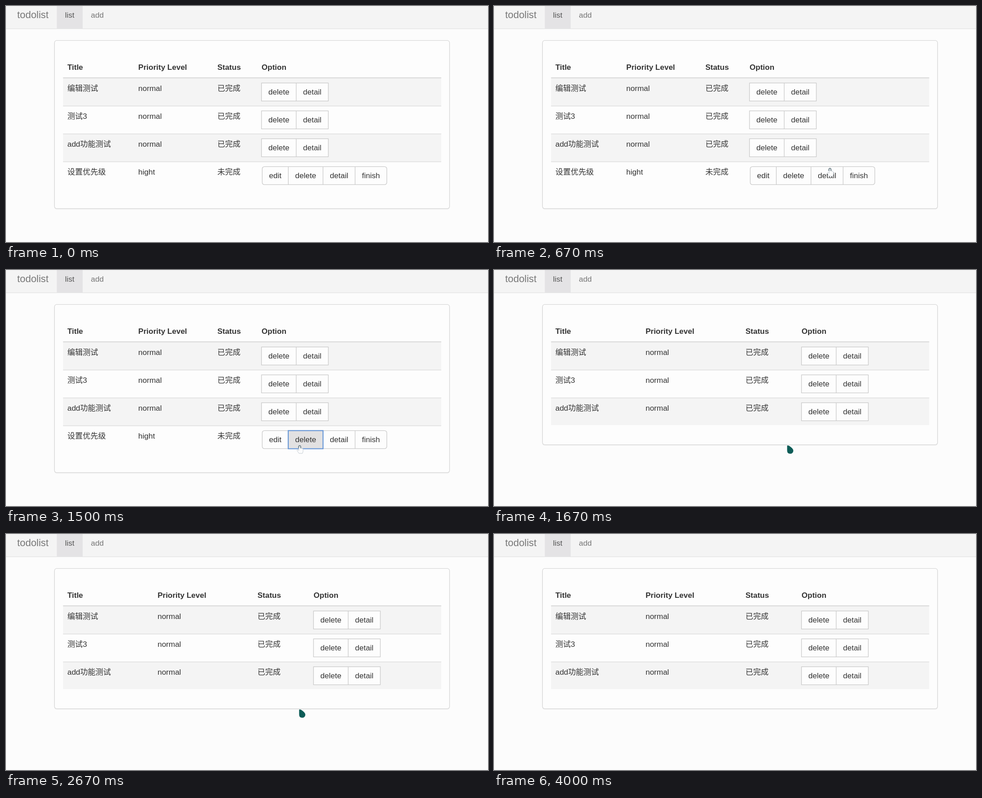
Write an HTML page that moves like this. It is 1066 px wide and 525 px high and loops after 4.49 s.

```html
<!DOCTYPE html>
<html lang="zh-CN">
<head>
<meta charset="utf-8">
<title>todolist</title>
<style>
html, body { margin: 0; width: 100%; height: 100%; overflow: hidden; background: #fcfcfc; }
svg { display: block; width: 100vw; height: 100vh; }
text { font: 17px "Liberation Sans", Arial, "Noto Sans CJK SC", "Noto Sans CJK", sans-serif; fill: #333; white-space: pre; }
.head { font-weight: bold; }
.brand { font-size: 21.86px; fill: #777; }
.link { fill: #777; }
.on { fill: #555; }
.btn { fill: #fdfdfd; stroke: #c9c9c9; stroke-width: 1.3; }
.line { fill: #dadada; }
.stripe { fill: #f4f4f4; }
</style>
</head>
<body>
<svg id="stage" viewBox="0 0 1066 525"></svg>
<script>
const LOOP = 4490;
const stage = document.getElementById("stage");

function add(parent, tag, attrs, label) {
  const el = document.createElementNS("http://www.w3.org/2000/svg", tag);
  for (const key in attrs) el.setAttribute(key, attrs[key]);
  if (label) el.textContent = label;
  parent.append(el);
  return el;
}
const rect = (p, x, y, width, height, more) => add(p, "rect", { x, y, width, height, ...more });
const text = (p, x, y, label, cls = "") => add(p, "text", { x, y, class: cls }, label);

const WIDTH = { edit: 59, delete: 77.9, detail: 72.2, finish: 71.3 };

// Joined buttons; returns the left edge of each
function buttons(p, x, y, names, radius) {
  const edges = {};
  const total = names.reduce((sum, n) => sum + WIDTH[n] - 1.2, 1.2);
  rect(p, x + .6, y + .6, total - 1.2, 40.1, { rx: radius, class: "btn" });
  names.forEach((name, i) => {
    edges[name] = x;
    if (i) add(p, "path", { d: `M${x + .6} ${y + .6}v40.1`, class: "btn" });
    text(p, x + 15.8, y + 26.3, name);
    x += WIDTH[name] - 1.2;
  });
  return edges;
}

// Page bar
rect(stage, 0, 0, 1066, 50.5, { fill: "#f4f4f4" });
rect(stage, 0, 50, 1066, 1.2, { fill: "#e2e2e2" });
rect(stage, 112.4, 0, 57.2, 50.3, { fill: "#e4e3e5" });
text(stage, 24.8, 27.3, "todolist", "brand");
text(stage, 130.5, 25.8, "list", "on");
text(stage, 187.8, 25.8, "add", "link");

const ROWS = [
  ["编辑测试", "normal", "已完成"],
  ["测试3", "normal", "已完成"],
  ["add功能测试", "normal", "已完成"],
  ["设置优先级", "hight", "未完成"]
];

function table(count, cols) {
  const g = add(stage, "g", {});
  const h = 126 + count * 62;
  rect(g, 107.3, 77.9, 873.6, h, { rx: 5, fill: "none", stroke: "#ededed", "stroke-width": 1.4 });
  rect(g, 107.3, 76.7, 873.6, h, { rx: 5, fill: "#fdfdfd", stroke: "#d8d8d8", "stroke-width": 1.3 });
  ["Title", "Priority Level", "Status", "Option"].forEach((t, i) => text(g, cols[i], 142, t, "head"));
  ROWS.slice(0, count).forEach((row, i) => {
    const y = 160 + i * 62;
    if (i % 2 === 0) rect(g, 126.2, y, 836.3, i === 2 && count === 3 ? 61 : 62, { class: "stripe" });
    rect(g, 126.2, i ? y - .1 : 158.7, 836.3, i ? 1.3 : 2.2, { class: "line" });
    row.forEach((t, c) => text(g, cols[c], y + 29, t));
    if (i < 3) buttons(g, cols[3] - .8, y + 10.7, ["delete", "detail"], 0);
  });
  return g;
}

const full = table(4, [135.7, 292.6, 467.4, 565.3]);
buttons(full, 566, 356.7, ["edit", "delete", "detail", "finish"], 5);
const press = add(full, "g", {});
const pressBox = rect(press, 624.2, 357.3, 77, 40.3, {});
text(press, 639.6, 383, "delete");
const short = table(3, [135.7, 335.2, 556.2, 680.3]);

const drop = add(stage, "path", {
  d: "M.3 1.6Q.4 0 2 .2 5 .8 8 3.5 14 8 14 12A6.8 6.8 0 0 1 7 18.8Q.3 18.8 .3 11.5Z",
  fill: "#0d5c57"
});

// Hand pointer with its fingertip at the origin
const hand = add(stage, "g", {});
add(hand, "path", {
  d: "M-1.8 10V2Q-1.8 .4 0 .4T1.8 2V7Q4 6.2 5 7.8 7 7.4 7.6 9V13Q7.4 16 6 18.5H-1.5Q-3 16-6 12.2-6.4 9.5-3.4 10.8L-1.8 12Z",
  fill: "#fcfcfc", stroke: "#c3cbd2", "stroke-width": 1
});
add(hand, "path", {
  d: "M-2.3 7V3A2.4 2.4 0 0 1 2.3 3V7", fill: "none", stroke: "#74868d", "stroke-width": 2
});

// start ms, pointer, x, y, delete button state
const STEPS = [
  [0],
  [500, drop, 844, 352],
  [670, hand, 743, 360],
  [830, hand, 748, 393.5],
  [1000, hand, 649.5, 389.5, "hover"],
  [1500, hand, 649.5, 389.5, "focus"],
  [1670, drop, 648, 390],
  [3670, drop, 598.8, 449],
  [3830, drop, 578.6, 497],
  [4000]
];
const LOOK = {
  hover: ["#e5e4e5", "#b0b0b0", 1.3],
  focus: ["#e2e1e2", "#5f92d6", 2]
};
const show = (el, on) => el.setAttribute("visibility", on ? "visible" : "hidden");

function draw(now) {
  const t = now % LOOP;
  const [, pointer, x, y, state] = STEPS.filter(s => s[0] <= t).pop();
  full.style.display = t < 1670 ? "" : "none";
  short.style.display = t < 1670 ? "none" : "";
  for (const el of [drop, hand]) show(el, el === pointer);
  if (pointer) pointer.setAttribute("transform", `translate(${x} ${y})`);
  show(press, state);
  if (state) {
    const [fill, stroke, width] = LOOK[state];
    pressBox.setAttribute("fill", fill);
    pressBox.setAttribute("stroke", stroke);
    pressBox.setAttribute("stroke-width", width);
  }
}

const start = performance.now();
function tick() {
  draw(performance.now() - start);
  requestAnimationFrame(tick);
}
tick();
</script>
</body>
</html>
```
